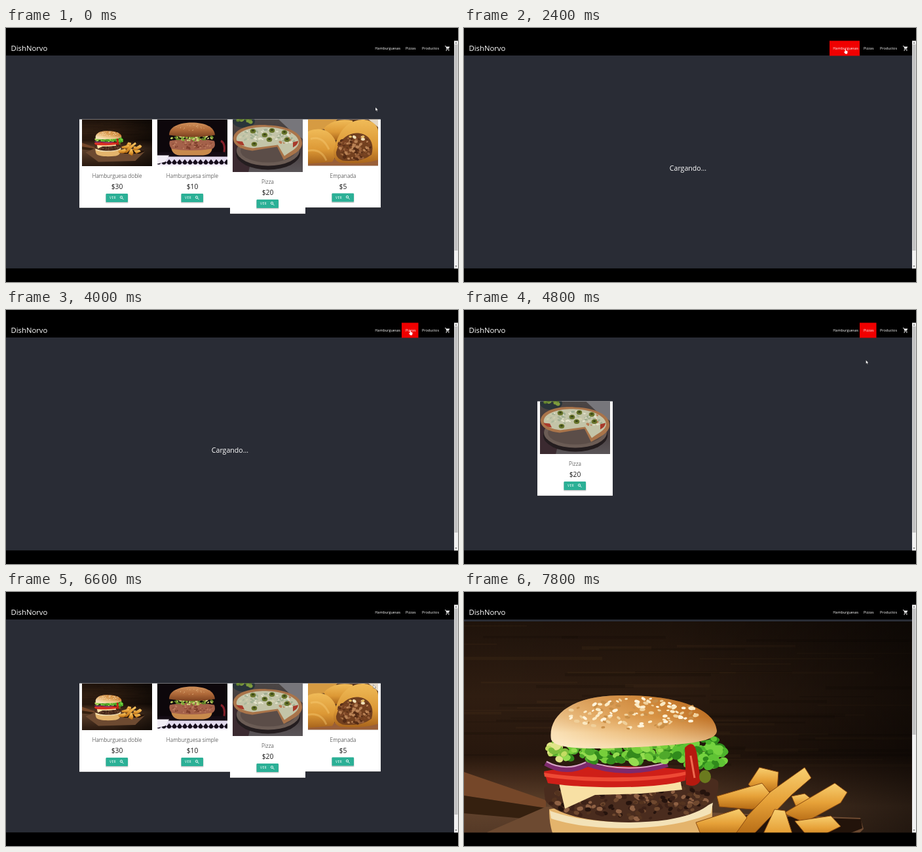
Write an HTML page that moves like this. It is 690 by 388 pixels and loops after 8 s.

```html
<!DOCTYPE html>
<html lang="es">
<head>
<meta charset="utf-8">
<style>
  html, body { margin: 0; width: 100%; height: 100%; overflow: hidden; background: #000; }
  svg { display: block; font-family: "Open Sans", "Noto Sans", sans-serif; }
  #stage { width: 690px; height: 388px; }
</style>
</head>
<body>
<svg id="stage" viewBox="0 0 690 388"></svg>
<script>
const LOOP = 8000;

let seed = 7;
const rand = () => (seed = seed * 16807 % 2147483647) / 2147483647;
const rect = (x, y, w, h, fill, more = '') =>
  `<rect x="${x}" y="${y}" width="${w}" height="${h}" fill="${fill}" ${more}/>`;
const oval = (cx, cy, rx, ry, fill, more = '') =>
  `<ellipse cx="${cx}" cy="${cy}" rx="${rx}" ry="${ry}" fill="${fill}" ${more}/>`;
const path = (d, fill, more = '') => `<path d="${d}" fill="${fill}" ${more}/>`;
const label = (x, y, size, text, more = 'fill="#fff"') =>
  `<text x="${x}" y="${y}" font-size="${size}" ${more}>${text}</text>`;
const repeat = (n, make) => Array.from({ length: n }, (_, i) => make(i)).join('');

// Random blobs inside an ellipse
const scatter = (n, cx, cy, rx, ry, size, ratio, colours) => repeat(n, i => {
  const angle = rand() * 6.283, reach = Math.sqrt(rand()), r = size * (0.6 + rand() * 0.7);
  const x = (cx + Math.cos(angle) * reach * rx).toFixed(1), y = (cy + Math.sin(angle) * reach * ry).toFixed(1);
  return oval(x, y, r.toFixed(1), (r * ratio).toFixed(1), colours[i % colours.length],
    `transform="rotate(${(rand() * 80 - 40).toFixed()} ${x} ${y})"`);
});

const gradient = (id, stops, dir = 'x2="0" y2="1"') => `<linearGradient id="${id}" ${dir}>` +
  stops.map(([at, colour]) => `<stop offset="${at}" stop-color="${colour}"/>`).join('') + '</linearGradient>';
const defs = '<defs>' +
  gradient('wood', [[0, '#1f130b'], [.25, '#2f1d11'], [.45, '#27170d'], [.5, '#3a2416'], [.62, '#62432d'], [1, '#2a1a10']]) +
  gradient('shade', [[0, '#0000'], [.45, '#0001'], [1, '#0009']], '') +
  gradient('bun', [[0, '#f8dfb4'], [.3, '#edbd7c'], [.65, '#dc9a4c'], [1, '#b9691f']], 'y1=".6" x2="1" y2=".4"') +
  gradient('bunGlow', [[0, '#b5651c66'], [.4, '#c87a2844'], [.7, '#fbe3b855'], [1, '#fff0d2aa']]) +
  gradient('fry', [[0, '#f8cf70'], [.5, '#e6a138'], [1, '#b56a14']]) +
  gradient('dough', [[0, '#f0bb58'], [.6, '#dc9835'], [1, '#a8641c']]) +
  gradient('redbun', [[0, '#d0905a'], [.5, '#b06a3a'], [1, '#7c4220']]) +
  gradient('planks', [[0, '#4b4645'], [.5, '#43383a'], [1, '#5a5558']]) +
  '</defs>';

const fries = ['434 294L451 268L480 275L478 303L450 308', '386 312L455 292L474 316L440 332L390 328',
  '500 312L520 308L545 328L510 335', '488 338L566 292L585 306L575 322L520 352',
  '404 372L468 305L520 268L530 284L500 310L440 372', '354 352L420 331L432 345L410 376L362 372',
  '452 380L474 332L490 334L502 372L490 400', '505 350L560 342L575 358L530 380'];

const art = {
  doble: {
    box: '0 45 684 456',
    draw: rect(0, 45, 684, 456, 'url(#wood)') +
      repeat(60, () => rect((rand() * 640 - 80).toFixed(), (50 + rand() * 215).toFixed(),
        (90 + rand() * 200).toFixed(), (1 + rand() * 4).toFixed(1), rand() < .5 ? '#573820' : '#0c0603', 'opacity=".18"')) +
      rect(0, 45, 684, 456, 'url(#shade)') +
      path('M0 275L125 318L125 330L0 311Z', '#754729') + path('M0 311L125 330L90 346L0 338Z', '#35200f') +
      path('M35 367L125 328L605 345L610 362L520 450L160 460Z', '#6d4a31') +
      path('M395 340L606 347L608 361L560 380L400 380Z', '#22130a') +
      path('M130 332C180 322 330 322 379 328C380 365 372 395 330 402C240 412 165 405 143 385C133 370 130 350 130 332Z', '#e4b46c') +
      path('M131 334C190 356 300 362 380 322L377 338C310 368 190 366 133 346Z', '#f3e2b8') +
      path('M122 300C124 282 380 268 388 290C391 318 370 338 310 348C230 359 140 346 124 318Z', '#4a2c1e') +
      scatter(210, 255, 316, 126, 31, 4, .7, ['#25130d', '#70492f', '#3c2117', '#8f6144', '#54331f']) +
      path('M145 292L330 286L333 302L270 308L200 310L154 331Z', '#f8e0a4') +
      path('M122 274C180 262 300 266 340 272L338 288C290 302 180 300 128 292Z', '#cf1f18') +
      path('M122 276C180 286 290 286 340 274L340 279C290 292 180 292 123 282Z', '#ee4a35') +
      path('M124 262Q155 280 187 264M185 262Q245 284 311 264', 'none', 'stroke="#7d2a6c" stroke-width="7"') +
      path('M126 259Q155 275 186 260M188 258Q245 278 308 261', 'none', 'stroke="#d7a4c6" stroke-width="2"') +
      scatter(150, 240, 245, 106, 15, 7, .7, ['#4fa92b', '#77cf3b', '#338a1c', '#95dc50']) +
      scatter(100, 364, 245, 40, 24, 7, .8, ['#4db32c', '#74d23f', '#2f8a1c', '#5fc334']) +
      scatter(20, 141, 243, 14, 18, 6, .8, ['#c3dc62', '#7cbb3a', '#e0e488']) +
      path('M337 238Q352 222 356 250L361 288Q354 300 339 294Z', '#b5190f') +
      path('M346 250L352 284', 'none', 'stroke="#ee6a50" stroke-width="3"') +
      oval(368, 282, 9, 10, '#6b7a1e') +
      ['bun', 'bunGlow'].map(id => path('M133 225C128 188 165 159 235 158C325 157 383 178 386 212' +
        'C385 230 335 233 262 237C190 241 138 240 133 225Z', `url(#${id})`)).join('') +
      scatter(120, 258, 186, 100, 24, 3.6, .55, ['#fbeac4', '#c98f48', '#fff3da', '#f0d09a']) +
      fries.map(p => path(`M${p}Z`, 'url(#fry)', 'stroke="#8a4a10"')).join('')
  },
  simple: {
    box: '0 0 107 71.5',
    draw: rect(0, 0, 107, 72, '#0d070b') + rect(0, 54, 107, 18, '#e3dbee') +
      rect(0, 50, 107, 7, '#140c14') +
      repeat(14, i => path(`M${i * 8 - 2} 66l4 -5l4 5l-4 5z`, '#160d1c')) + rect(0, 69, 107, 2.5, '#f6f2fa') +
      path('M0 55L18 55L12 65L0 68Z', '#f2edf6') +
      path('M97 33Q104 36 102 50', 'none', 'stroke="#84202a" stroke-width="3"') +
      path('M21 42H84Q84 54 70 55H34Q22 54 21 42Z', '#c88a4c') +
      path('M19 33Q50 26 87 33Q90 42 84 45Q50 50 22 45Q17 40 19 33Z', '#a4614a') +
      scatter(60, 53, 39, 32, 6, 1.5, .7, ['#7d3e2c', '#bd7c5f', '#92503a']) +
      scatter(80, 53, 28, 34, 4.5, 2, .7, ['#a4b83e', '#5f8128', '#d9d885', '#7ea636']) +
      path('M18 24C18 10 36 5 53 5C72 5 87 11 88 24Q54 30 18 24Z', 'url(#redbun)') +
      scatter(24, 52, 12, 24, 5, .6, .6, ['#e6b985'])
  },
  pizza: {
    box: '0 0 107 80.5',
    draw: rect(0, 0, 107, 81, 'url(#planks)') + path('M0 30L30 55L24 81H0Z', '#3b2a30') +
      path('M70 0H107V30L85 14Z', '#77767b') +
      oval(17, 3, 17, 10, '#29343a') + scatter(14, 17, 2, 12, 5, 3, .8, ['#7d9a3d', '#5c7b2b']) +
      oval(54, 52, 49, 25, '#241d1f') + oval(54, 48, 48, 23, '#6b5c55') + oval(54, 48, 42, 18, '#554843', 'opacity=".7"') +
      path('M1 28C4 12 32 7 54 9C86 10 108 22 106 38C105 48 91 55 78 62L68 42L48 45L30 48C12 46 0 39 1 28Z', '#a9744a') +
      path('M6 28C10 15 36 11 54 12C82 13 102 24 101 36C100 44 88 49 79 56L69 39L47 42L31 44C15 42 4 36 6 28Z', '#c3c4a8') +
      scatter(50, 42, 24, 32, 10, 2.4, .5, ['#9fae92', '#e6e5cf', '#d2d1b0', '#adb89c']) +
      scatter(26, 82, 29, 14, 9, 2.2, .6, ['#e2dfc8', '#a3b091', '#b97c54']) +
      path('M5 33Q10 40 18 40L15 34ZM92 43Q100 39 100 33L92 35Z', '#a83a2b') +
      [[33, 38], [31, 18], [49, 24], [60, 17], [79, 20], [83, 31], [56, 31]].map(([x, y]) =>
        oval(x, y, 4.3, 3.6, '#667329') + oval(x, y - .8, 2, 1.3, '#343f17')).join('')
  },
  empanada: {
    box: '0 0 107 71',
    draw: rect(0, 0, 107, 71, '#59371f') + rect(0, 60, 107, 11, '#9a5f38') +
      path('M0 0H45L32 14L0 18Z', '#d69b42') + path('M92 0H107V12Z', '#e3d8c6') +
      path('M24 14Q40 -3 68 2L72 30L35 32Z', 'url(#dough)') +
      path('M0 18Q28 8 41 31Q49 48 37 65L0 68Z', 'url(#dough)') +
      path('M4 30Q22 24 32 46M0 48Q20 44 28 63', 'none', 'stroke="#f7ce77" stroke-width="3" opacity=".4"') +
      path('M39 48C45 24 54 6 77 1C94 -2 107 8 107 18V62Q80 70 48 66Q38 62 39 48Z', 'url(#dough)') +
      path('M43 50C47 34 57 22 74 21C94 21 102 37 97 54Q82 66 53 63Q42 59 43 50Z', '#72401f') +
      scatter(120, 71, 43, 26, 19, 2.3, .75, ['#98603a', '#542b15', '#b98255', '#7b4424']) +
      scatter(5, 74, 29, 13, 6, 2.6, .7, ['#f0dfb7', '#e8bc60'])
  }
};

const photo = (name, x, y, w, h) =>
  `<svg x="${x}" y="${y}" width="${w}" height="${h}" viewBox="${art[name].box}" preserveAspectRatio="none">${art[name].draw}</svg>`;

const products = {
  doble: ['Hamburguesa doble', 30, 71.5], simple: ['Hamburguesa simple', 10, 71.5],
  pizza: ['Pizza', 20, 80.5], empanada: ['Empanada', 5, 71]
};

function card(name, slot, top) {
  const [title, price, height] = products[name], x = 112 + 115 * slot, mid = x + 57.5, y = top + height;
  const centred = 'text-anchor="middle" fill="#1c1c1c"';
  return rect(x, top + 1, 115, height + 64, '#0004') + rect(x, top, 115, height + 63.7, '#fff') +
    photo(name, x + 4, top, 107, height) +
    label(mid, y + 18, 8.3, title, centred + ' font-weight="300"') +
    label(mid, y + 35, 10.3, '$' + price, centred) +
    rect(x + 40, y + 43, 34.5, 13.5, '#0003', 'rx="1"') + rect(x + 40.5, y + 42, 33.5, 13, '#2bb096', 'rx="1"') +
    label(x + 46, y + 50.4, 5, 'VER', 'fill="#fff" letter-spacing=".4"') +
    `<g fill="none" stroke="#fff" stroke-width=".9"><circle cx="${x + 64}" cy="${y + 47.6}" r="1.7"/>` +
    `<path d="M${x + 65.3} ${y + 48.9}l2.2 2.2"/></g>`;
}

const loading = (text, y) => label(342, y, 10.6, text, 'fill="#fff" text-anchor="middle"');
const scenes = {
  all: Object.keys(products).map((name, i) => card(name, i, 139.5)).join(''),
  burgers: card('doble', 0, 144) + card('simple', 1, 144),
  pizza: card('pizza', 0, 139.5),
  loading: loading('Cargando...', 217.5),
  loadingItem: loading('Cargando item...', 221),
  item: photo('doble', 0, 45, 684, 456)
};

// start time, scene, highlighted link
const timeline = [
  [0, 'all'], [2100, 'loading', 'burgers'], [2800, 'burgers', 'burgers'], [3800, 'loading', 'pizzas'],
  [4500, 'pizza', 'pizzas'], [5700, 'loading'], [6500, 'all'], [7200, 'loadingItem'], [7600, 'item']
];

// time, x, y of the pointer tip
const route = [
  [0, 564, 121], [100, 564, 121], [900, 571, 165], [1500, 576.5, 202.5], [1800, 579, 110], [2050, 581, 32],
  [2450, 581, 32], [2850, 582.5, 51.5], [3200, 582.5, 51.5], [3600, 616, 31], [4000, 616, 31],
  [4600, 613.5, 76.5], [4850, 613.5, 76.5], [5500, 645, 31], [5700, 645, 31], [6000, 585.5, 138],
  [6500, 585.5, 138], [7150, 203.5, 194], [LOOP, 203.5, 194]
];

const stage = document.getElementById('stage');
stage.innerHTML = defs + rect(0, 0, 690, 388, '#000') + rect(0, 42, 684, 325.5, '#292c35') +
  Object.entries(scenes).map(([id, body]) => `<g id="${id}">${body}</g>`).join('') +
  rect(0, 367.5, 690, 21, '#000') +
  rect(558, 19.5, 46, 23, '#f00000', 'id="linkBurgers"') + rect(604, 19.5, 25.5, 23, '#f00000', 'id="linkPizzas"') +
  label(7.5, 35.3, 11.3, 'DishNorvo') +
  label(563.3, 33, 5.5, 'Hamburguesas') + label(610, 33, 5.5, 'Pizzas') + label(635, 33, 5.5, 'Productos') +
  '<g transform="translate(669.6 26.4) scale(.37)">' +
  path('M1 3H4L9 14H17L21 6H6', '#fff') +
  path('M1 3H4L9 14L6.5 17H19', 'none', 'stroke="#fff" stroke-width="2"') +
  oval(7, 21, 2, 2, '#fff') + oval(17, 21, 2, 2, '#fff') + '</g>' +
  rect(684, 19.5, 6, 348, '#f1f1f1') + rect(684.5, 25, 5, 315, '#c1c1c1', 'id="thumb"') +
  path('M685.5 23.5l1.5-2l1.5 2zM685.5 363l1.5 2l1.5-2z', '#606060') +
  '<g id="pointer">' +
  path('M0 0V5.6L1.3 4.5L2.2 6.4L3.1 6L2.3 4.2H4Z', '#fff', 'id="arrow" stroke="#000" stroke-width=".3"') +
  path('M.6 0Q1.4-.3 1.7.6V2.6L4.1 3.2Q4.8 3.6 4.6 4.5L4 7.6H1.2L-1 4.8Q-1.2 4 0 4.2L.5 4.8Z', '#fff', 'id="hand"') +
  '</g>';

const get = id => document.getElementById(id);
const show = (id, on) => get(id).style.display = on ? '' : 'none';

function pointerAt(t) {
  const i = route.findIndex(([end]) => end > t);
  const [t0, x0, y0] = route[i - 1], [t1, x1, y1] = route[i];
  const u = (t - t0) / (t1 - t0), eased = u * u * (3 - 2 * u);
  return [x0 + (x1 - x0) * eased, y0 + (y1 - y0) * eased];
}

function render(t) {
  const [, scene, link] = timeline.filter(([start]) => start <= t).pop();
  for (const id in scenes) show(id, id === scene);
  show('linkBurgers', link === 'burgers');
  show('linkPizzas', link === 'pizzas');
  get('thumb').setAttribute('height', scene === 'item' ? 193 : 315);

  const [x, y] = pointerAt(t), overLink = y < 42 || t > 7000;
  get('pointer').setAttribute('transform', `translate(${x} ${y})`);
  show('pointer', scene !== 'item');
  show('arrow', !overLink);
  show('hand', overLink);
}

const began = performance.now();
function tick() {
  render((performance.now() - began) % LOOP);
  requestAnimationFrame(tick);
}
tick();
</script>
</body>
</html>
```
